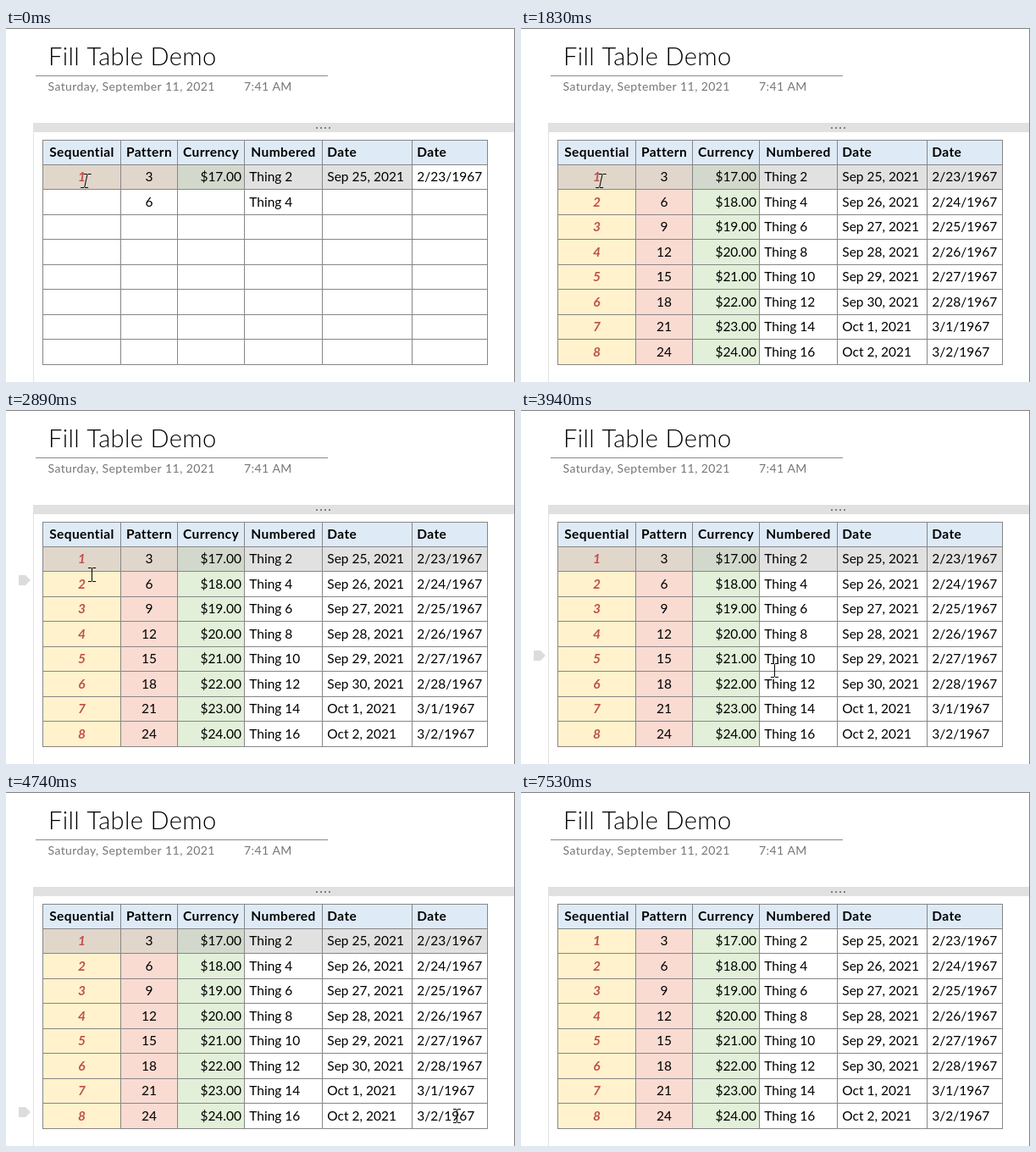
Animation of 601x418 px, one loop 7630 ms. Source, as an HTML page with a canvas:

```html
<!DOCTYPE html>
<html lang="en">
<head>
<meta charset="utf-8">
<title>Fill Table Demo</title>
<style>
html, body { margin: 0; width: 601px; height: 418px; overflow: hidden; background: #fff; }
canvas { display: block; }
</style>
</head>
<body>
<canvas id="stage" width="601" height="418"></canvas>
<script>
const ctx = document.getElementById('stage').getContext('2d');
const LOOP = 7630, FILLED = 1830, MOVE = 2890, LEAVE = 5850, DESELECTED = 7530;
const TICK = 132; // ms between pointer updates
const ROW = 29.45;
const GRID = '#868686', PANEL = '#e1e1e1', SELECTED = '#e1e1e1';
const colX = [43, 135, 202, 281, 373, 479, 568];
const rowY = i => Math.floor(132 + i * ROW);
const baseline = i => Math.floor(152.5 + i * ROW);

const columns = [
  { head: 'Sequential', align: 'center', fill: '#fff2cc', picked: '#e1d6ca',
    color: '#c0504d', style: 'italic bold', text: n => n + 1 },
  { head: 'Pattern', align: 'center', fill: '#fadbd2', picked: '#e1d6cc', seeds: 2,
    text: n => 3 * (n + 1) },
  { head: 'Currency', align: 'right', fill: '#e2efd9', picked: '#d2d9cc', text: n => `$${17 + n}.00` },
  { head: 'Numbered', seeds: 2, text: n => `Thing ${2 * (n + 1)}` },
  { head: 'Date', headAlign: 'left', text: n => {
    const d = new Date(2021, 8, 25 + n);
    return `${d.getMonth() === 8 ? 'Sep' : 'Oct'} ${d.getDate()}, 2021`;
  } },
  { head: 'Date', headAlign: 'left', text: n => {
    const d = new Date(1967, 1, 23 + n);
    return `${d.getMonth() + 1}/${d.getDate()}/1967`;
  } }
];

// Bends of the pointer path: tick, x, y
const path = [[0, 101, 194], [3, 146, 250], [6, 259, 293], [9, 378, 335], [11, 481, 359], [14, 532, 382]];

function rect(color, x, y, w, h) {
  ctx.fillStyle = color;
  ctx.fillRect(x, y, w, h);
}

function label(str, x, y, { size = 15.5, style = '', color = '#000', align = 'left', spacing = 0 } = {}) {
  ctx.font = `${style} ${size}px Lato, sans-serif`;
  ctx.letterSpacing = `${spacing}px`;
  ctx.fillStyle = color;
  ctx.textAlign = align;
  ctx.fillText(str, x, y);
}

function textX(i, align = 'left') {
  const left = colX[i], right = colX[i + 1];
  return { left: left + 6.3, center: (left + right) / 2 + .5, right: right - 3 }[align];
}

function drawPage() {
  rect('#fff', 0, 0, 601, 418);
  rect('#808080', 0, 0, 601, 1);
  label('Fill Table Demo', 50, 44, { size: 29, style: '300', spacing: .4 });
  rect('#8a8a8a', 35, 56, 345, 1);
  const small = { size: 14, color: '#767676', spacing: .4 };
  label('Saturday, September 11, 2021', 49.5, 74, small);
  label('7:41 AM', 281, 74, small);
  rect(PANEL, 32, 112, 568, 11);
  rect(PANEL, 32, 123, 1, 295);
  for (let i = 0; i < 4; i++) rect('#808080', 366 + i * 5, 117, 2, 2);
  rect('#808080', 600, 0, 1, 418);
}

function drawTable(t) {
  rect('#deebf6', 43, rowY(0), 525, rowY(1) - rowY(0));
  columns.forEach((c, i) => {
    const align = c.headAlign || 'center';
    label(c.head, textX(i, align), baseline(0), { style: 'bold', align, spacing: .4 });
    for (let n = 0; n < 8; n++) {
      const y = rowY(n + 1);
      const picked = n === 0 && t < DESELECTED && (i < 5 || t >= 120);
      const fill = picked ? c.picked || SELECTED : t >= FILLED && c.fill;
      if (fill) rect(fill, colX[i], y, colX[i + 1] - colX[i], rowY(n + 2) - y);
      if (t >= FILLED || n < (c.seeds || 1)) label(c.text(n), textX(i, c.align), baseline(n + 1), c);
    }
  });
  for (let i = 0; i < 10; i++) rect(GRID, 43, rowY(i), 526, 1);
  for (const x of colX) rect(GRID, x, rowY(0), 1, rowY(9) - rowY(0) + 1);
}

function drawTag(y) {
  ctx.beginPath();
  ctx.moveTo(15, y);
  ctx.lineTo(23, y);
  ctx.lineTo(29, y + 6);
  ctx.lineTo(23, y + 12);
  ctx.lineTo(15, y + 12);
  ctx.fillStyle = '#dcdcdc';
  ctx.fill();
}

function pointerAt(t) {
  if (t < MOVE) return [94, 180];
  if (t >= LEAVE) {
    const step = Math.floor((t - LEAVE) / 135);
    return [547 + 2 * step, 403 + 12 * step];
  }
  const tick = Math.min(14, Math.floor((t - MOVE) / TICK));
  const next = Math.max(1, path.findIndex(p => p[0] >= tick));
  const [k0, x0, y0] = path[next - 1], [k1, x1, y1] = path[next];
  const f = (tick - k0) / (k1 - k0);
  return [Math.round(x0 + (x1 - x0) * f), Math.round(y0 + (y1 - y0) * f)];
}

function drawPointer(t) {
  const [x, y] = pointerAt(t);
  if (t >= MOVE && t < LEAVE) drawTag(rowY(Math.floor((y - 134) / ROW)) + 5);
  ctx.save();
  // The beam leans while it rests on italic text
  ctx.transform(1, 0, t < MOVE ? -.22 : 0, 1, x, y);
  rect('#000', 0, -7, 1, 15);
  for (const end of [-8, 8]) {
    rect('#000', -4, end, 4, 1);
    rect('#000', 1, end, 4, 1);
  }
  ctx.restore();
}

function frame(now) {
  const t = now % LOOP;
  drawPage();
  drawTable(t);
  drawPointer(t);
  requestAnimationFrame(frame);
}
frame(0);
</script>
</body>
</html>
```
